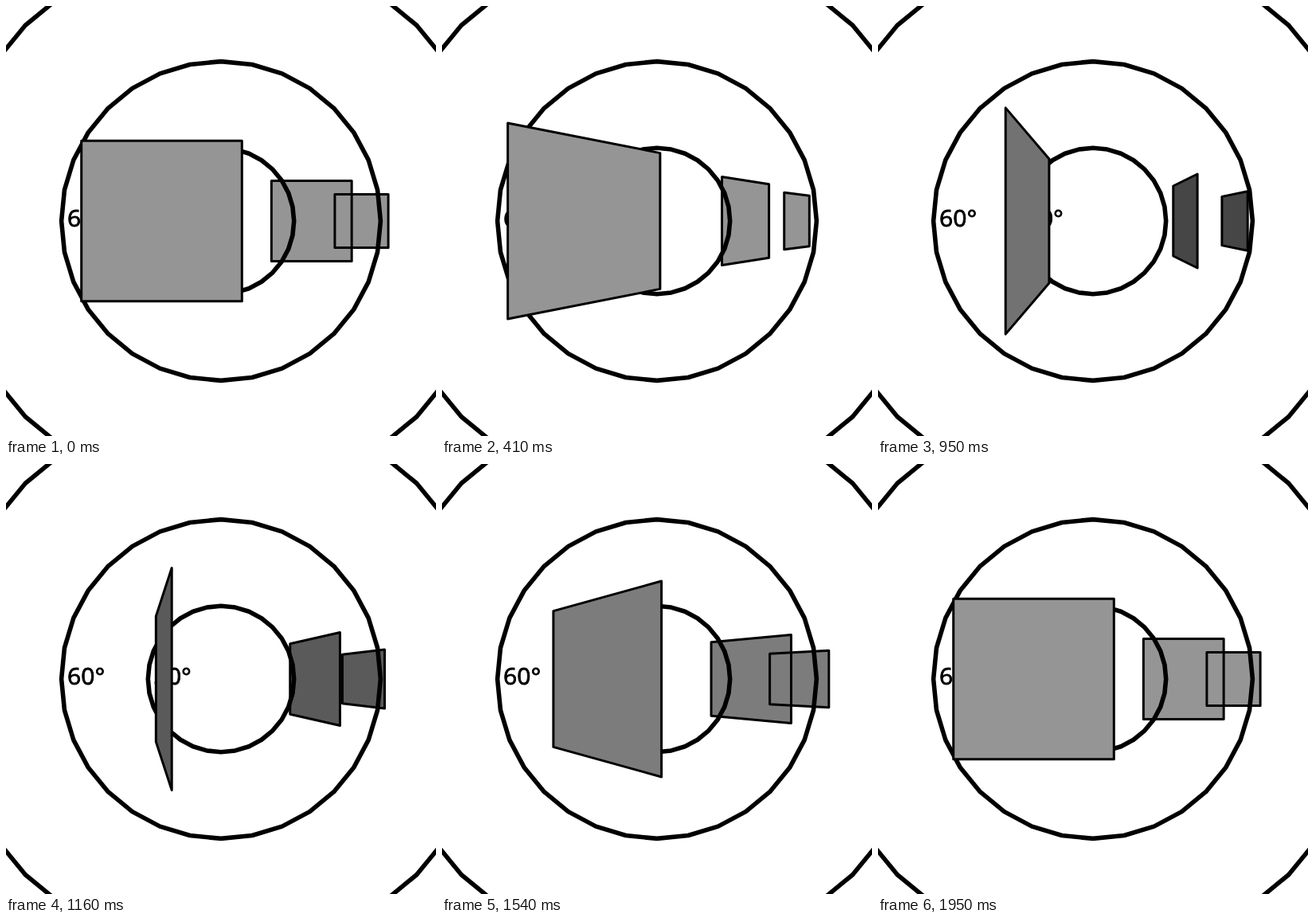
Recreate the animation shown at these times as an HTML page. Size 540 by 540 pixels, loop 2000 ms.

```html
<!DOCTYPE html>
<html lang="en">
<head>
<meta charset="utf-8">
<title>Field of view</title>
<style>
  html, body { margin: 0; width: 100%; height: 100%; overflow: hidden; background: #fff; }
  svg { display: block; width: 100vw; height: 100vh; }
  text { font: 30px "Open Sans", "Noto Sans", sans-serif; stroke: #000; stroke-width: 0.9; }
  .ring { fill: none; stroke: #000; stroke-width: 5.6; stroke-linejoin: round; }
  .edge { fill: none; stroke: #000; stroke-width: 3; stroke-linejoin: round; }
</style>
</head>
<body>
<svg viewBox="0 0 540 540">
  <g id="fills"></g>
  <g id="rings"></g>
  <g id="edges"></g>
  <g id="front"></g>
</svg>
<script>
const LOOP = 2000, FRAMES = 48;
const CENTER = 270, FOCAL = 346.4, HALF = 100.8;
const SIDES = 32;

function add(parent, tag, attrs) {
  const el = document.createElementNS("http://www.w3.org/2000/svg", tag);
  for (const name in attrs) el.setAttribute(name, attrs[name]);
  document.getElementById(parent).append(el);
  return el;
}

function ringPoints(r) {
  return Array.from({ length: SIDES }, (_, i) => {
    const a = i * 2 * Math.PI / SIDES;
    return [CENTER + r * Math.cos(a), CENTER + r * Math.sin(a)];
  }).join(" ");
}

for (const [r, label] of [[91.7, "30°"], [200.4, "60°"], [347.5, "90°"]]) {
  add("rings", "polygon", { class: "ring", points: ringPoints(r) });
  add("rings", "text", { x: CENTER - r + 7.5, y: 277 }).textContent = label;
}

// Squares recede from the viewer; the nearest one covers everything.
const squares = [2, 1, 0].map(i => ({
  x: -74.5 + 302 * i,
  z: FOCAL * (i + 1),
  fill: add(i ? "fills" : "front", "polygon", {}),
  edge: add(i ? "edges" : "front", "polygon", { class: "edge" })
}));

function project(x, y, z) {
  return [CENTER + x * FOCAL / z, CENTER + y * FOCAL / z];
}

function drawSquare(s, turn) {
  const dx = HALF * Math.cos(turn), dz = HALF * Math.sin(turn);
  const corner = (side, y) => project(s.x + side * dx, y, s.z + side * dz);
  const points = [corner(-1, -HALF), corner(1, -HALF), corner(1, HALF), corner(-1, HALF)].join(" ");
  s.fill.setAttribute("points", points);
  s.edge.setAttribute("points", points);

  // The light strikes the front face; the back face gets the opposite shade.
  const facing = s.z * Math.cos(turn) - s.x * Math.sin(turn) > 0 ? 1 : -1;
  const gray = Math.round(92 + 60 * facing * Math.cos(turn - 0.34));
  s.fill.setAttribute("fill", `rgb(${gray},${gray},${gray})`);
}

// Frame starts are rounded down to 10 ms.
function frameAt(ms) {
  return Math.ceil((Math.floor(ms / 10) * 10 + 10) * FRAMES / LOOP) - 1;
}

const start = performance.now();

function draw() {
  const ms = Math.max(0, performance.now() - start) % LOOP;
  const turn = Math.PI * frameAt(ms) / (FRAMES - 1);
  squares.forEach(s => drawSquare(s, turn));
  requestAnimationFrame(draw);
}

draw();
</script>
</body>
</html>
```
